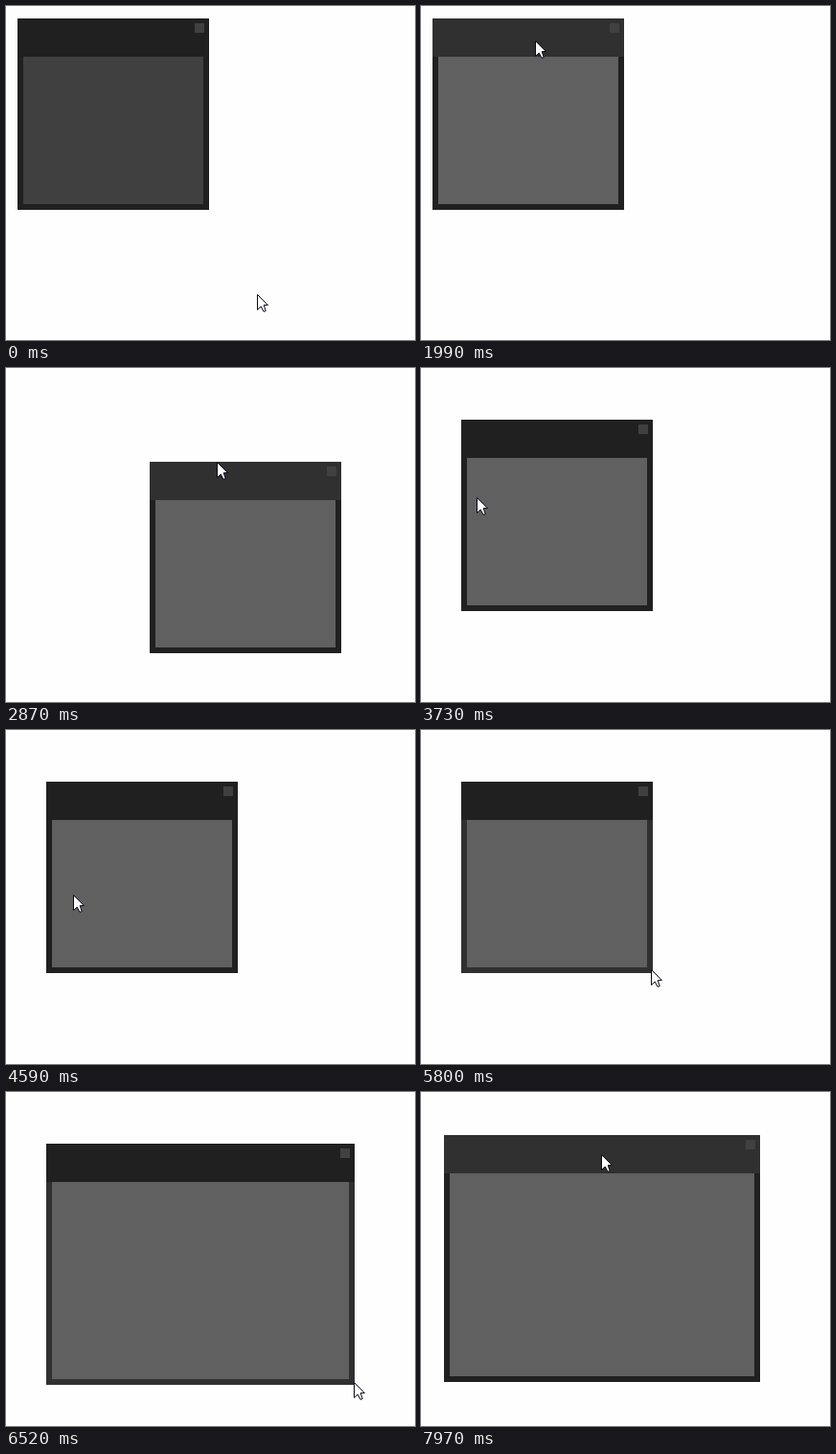
Recreate the animation shown at these times as an HTML page with a canvas. Size 427 by 349 pixels, loop 8 s.

```html
<!DOCTYPE html>
<html lang="en">
<head>
<meta charset="utf-8">
<title>Window drag and resize</title>
<style>
  html, body { margin: 0; width: 100%; height: 100%; overflow: hidden; background: #fefefe; }
  canvas { display: block; }
</style>
</head>
<body>
<canvas id="stage" width="427" height="349"></canvas>
<script>
const ctx = document.getElementById('stage').getContext('2d');
const LOOP = 8000;
const TITLE = 40, EDGE = 6;

// Pointer keys: time, x, y
const pointerKeys = [
  [0, 262, 301], [660, 146, 126], [1090, 146, 126], [1510, 118, 36],
  [1960, 118, 36], [1990, 119, 36], [2550, 286, 145], [2700, 286, 145],
  [2870, 220, 98], [3060, 163, 79], [3370, 148, 77], [3590, 148, 77],
  [3730, 58, 135], [3850, 35, 150], [4210, 43, 160], [4440, 43, 160],
  [5070, 232, 245], [5270, 232, 245], [5430, 238, 250], [5770, 238, 250],
  [5800, 240, 250], [6520, 363, 303], [6600, 364, 305], [6690, 368, 308],
  [6780, 368, 308], [7410, 213, 81], [7440, 212, 81], [7730, 212, 81],
  [7970, 188, 65], [8200, 150, 45]
];

// Window keys: time, x, y, width, height
const windowKeys = [
  [0, 12, 13, 200, 200], [1990, 12, 13, 200, 200], [2580, 180, 122, 200, 200],
  [2720, 180, 122, 200, 200], [2870, 150, 98, 200, 200], [3090, 64, 59, 200, 200],
  [3390, 42, 54, 200, 200], [5800, 42, 54, 200, 200], [6520, 42, 54, 322, 252],
  [6600, 42, 54, 325, 254], [6690, 42, 54, 330, 258], [7740, 42, 54, 330, 258],
  [7970, 24, 45, 330, 258], [8200, -12, 27, 330, 258]
];

// A held part stays lit while the window lags behind the pointer
const grabs = [
  [1960, 2600, 'title'], [2700, 3400, 'title'],
  [5770, 6700, 'edge'], [7730, 8000, 'title']
];

function slope(keys, i, c) {
  return (keys[i + 1][c] - keys[i][c]) / (keys[i + 1][0] - keys[i][0]);
}

// Harmonic mean of neighbouring slopes keeps the curve from overshooting
function tangent(keys, i, c) {
  if (i === 0 || i === keys.length - 1) return 0;
  const a = slope(keys, i - 1, c), b = slope(keys, i, c);
  return a * b <= 0 ? 0 : 2 * a * b / (a + b);
}

function sample(keys, t) {
  let i = 0;
  while (t >= keys[i + 1][0]) i++;
  const from = keys[i], to = keys[i + 1];
  const span = to[0] - from[0], u = (t - from[0]) / span;
  const v = 1 - u;
  return from.slice(1).map((p, n) => {
    const c = n + 1;
    return Math.round(
      p * (1 + 2 * u) * v * v +
      to[c] * u * u * (3 - 2 * u) +
      span * u * v * (v * tangent(keys, i, c) - u * tangent(keys, i + 1, c)));
  });
}

function hovered(t, px, py, [x, y, w, h]) {
  const grab = grabs.find(g => t >= g[0] && t < g[1]);
  if (grab) return grab[2];
  const dx = px - x, dy = py - y;
  if (dx < 0 || dy < 0 || dx >= w || dy >= h) return null;
  if (dy < TITLE) return 'title';
  return dx < EDGE || dx >= w - EDGE || dy >= h - EDGE ? 'edge' : 'body';
}

function box(color, x, y, w, h) {
  ctx.fillStyle = color;
  ctx.fillRect(x, y, w, h);
}

function drawWindow([x, y, w, h], part) {
  const tone = name => part === name ? '#303030' : '#202020';
  box(tone('edge'), x, y, w, h);
  box(tone('title'), x, y, w, TITLE);
  box(part ? '#606060' : '#404040', x + EDGE, y + TITLE, w - 2 * EDGE, h - TITLE - EDGE);
  box('#404040', x + w - 15, y + 5, 10, 10);
}

const arrow = new Path2D('M.5 .5V16.5L4.2 13L7 18.3L9.2 17.6L7.2 11.6H11.4Z');

function drawPointer(x, y) {
  ctx.save();
  ctx.translate(x, y);
  ctx.lineJoin = 'round';
  ctx.fillStyle = '#fff';
  ctx.strokeStyle = '#08081a';
  ctx.fill(arrow);
  ctx.stroke(arrow);
  ctx.restore();
}

function draw(t) {
  const [px, py] = sample(pointerKeys, t);
  const win = sample(windowKeys, t);
  box('#fefefe', 0, 0, 427, 349);
  drawWindow(win, hovered(t, px, py, win));
  drawPointer(px, py);
}

const start = performance.now();
function tick() {
  draw((performance.now() - start) % LOOP);
  requestAnimationFrame(tick);
}
tick();
</script>
</body>
</html>
```
